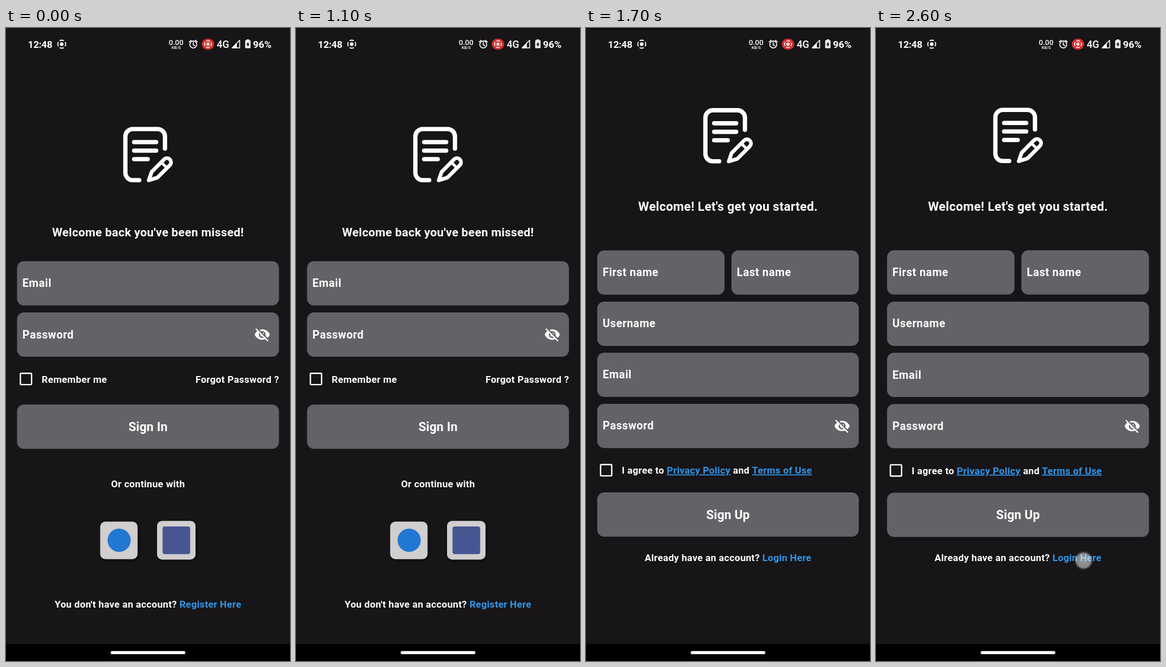
Animation, 502 px wide and 1115 px high, one loop 2.7 s. Source, as an HTML page:

```html
<!DOCTYPE html>
<html lang="en">
<head>
<meta charset="utf-8">
<title>Sign in and sign up</title>
<style>
  html, body { margin: 0; width: 100%; height: 100%; overflow: hidden; background: #000; }
  svg { display: block; width: 100vw; height: 100vh; }
  text { font-family: Roboto, sans-serif; font-weight: 700; fill: #fff; white-space: pre; }
  .label { font-size: 19.53px; letter-spacing: .55px; }
  .body { font-size: 17.08px; letter-spacing: .305px; }
  .h1 { font-size: 20.75px; letter-spacing: .305px; }
  .h2 { font-size: 21.96px; letter-spacing: .305px; }
  .btn { font-size: 21.96px; letter-spacing: .12px; }
  .link { fill: #2f97ea; }
  .under { text-decoration: underline; }
  .mid { text-anchor: middle; }
  .end { text-anchor: end; }
  .line { fill: none; stroke: #fff; stroke-linecap: round; stroke-linejoin: round; }
</style>
</head>
<body>
<svg viewBox="0 0 502 1115" preserveAspectRatio="none">
  <defs>
    <g id="note" class="line" stroke-width="7.6">
      <path d="M281 212.5V191a13 13 0 0 0-13-13H224a13 13 0 0 0-13 13V255a13 13 0 0 0 13 13H235.5"/>
      <path d="M226.5 201H265.5M226.5 216H265.5M226.5 231H250.5"/>
      <path stroke-width="6.6" d="M279.4 231.4L257.5 253.3L252.3 268.3L267.7 263.5L289.6 241.6A7.2 7.2 0 0 0 279.4 231.4Z"/>
      <path stroke-width="5" d="M274.5 236.5L284.5 246.5"/>
    </g>
    <path id="eye" fill="#fff" transform="translate(-14.65 -14.65) scale(1.22)" d="M12 7c2.76 0 5 2.24 5 5 0 .65-.13 1.26-.36 1.83l2.92 2.92c1.51-1.26 2.7-2.89 3.43-4.75-1.73-4.39-6-7.5-11-7.5-1.4 0-2.74.25-3.98.7l2.16 2.16C10.74 7.13 11.35 7 12 7zM2 4.27l2.28 2.28.46.46C3.08 8.3 1.78 10.02 1 12c1.73 4.39 6 7.5 11 7.5 1.55 0 3.03-.3 4.38-.84l.42.42L19.73 22 21 20.73 3.27 3 2 4.27zM7.53 9.8l1.55 1.55c-.05.21-.08.43-.08.65 0 1.66 1.34 3 3 3 .22 0 .44-.03.65-.08l1.55 1.55c-.67.33-1.41.53-2.2.53-2.76 0-5-2.24-5-5 0-.79.2-1.53.53-2.2zm4.31-.78l3.15 3.15.02-.16c0-1.66-1.34-3-3-3l-.17.01z"/>
    <g id="cast">
      <circle r="3.2" fill="#fff"/>
      <circle r="7" fill="none" stroke="#fff" stroke-width="1.8" pathLength="8" stroke-dasharray="1.45 .55" stroke-dashoffset=".725"/>
    </g>
    <radialGradient id="glow">
      <stop offset="0" stop-color="#fff" stop-opacity=".56"/>
      <stop offset=".62" stop-color="#fff" stop-opacity=".5"/>
      <stop offset=".76" stop-color="#fff" stop-opacity=".42"/>
      <stop offset=".84" stop-color="#fff" stop-opacity=".14"/>
      <stop offset="1" stop-color="#fff" stop-opacity="0"/>
    </radialGradient>
    <filter id="shade" x="-30%" y="-30%" width="160%" height="160%">
      <feDropShadow dx="2" dy="3" stdDeviation="3" flood-color="#000" flood-opacity=".5"/>
    </filter>
  </defs>

  <rect width="502" height="1115"/>
  <g id="login"></g>
  <g id="signup"></g>

  <g id="status">
    <text x="38.8" y="34.6" font-size="17.2" letter-spacing="-.25">12:48</text>
    <use href="#cast" x="98.5" y="28.5"/>
    <text x="300.7" y="30" class="mid" font-size="13" style="font-weight:500">0.00</text>
    <text x="300.8" y="37.3" class="mid" font-size="7.2" style="font-weight:500">KB/S</text>
    <g class="line" stroke-width="1.6">
      <circle cx="331" cy="29" r="6.1"/>
      <path d="M331 25.3V29.5L333.8 31.2M323.8 24.6L327.2 21.7M338.2 24.6L334.8 21.7"/>
    </g>
    <rect x="346" y="18.8" width="22" height="19.4" rx="9.7" fill="#d3302f"/>
    <use href="#cast" transform="translate(357 28.5) scale(.86)"/>
    <text x="372.6" y="34.8" font-size="17.6" style="font-weight:500">4G</text>
    <path d="M399.8 35L413 35V21.5Z" class="line" stroke-width="1.5"/>
    <path d="M399 35.5H408V26.5Z" fill="#fff"/>
    <path d="M425.5 20H429.5V21.6H431A1.2 1.2 0 0 1 432.2 22.8V34.4A1.2 1.2 0 0 1 431 35.6H424A1.2 1.2 0 0 1 422.8 34.4V22.8A1.2 1.2 0 0 1 424 21.6H425.5Z" fill="#fff"/>
    <path d="M428.3 23.8L424.6 29.7H427V33.7L430.5 27.8H428.3Z" fill="#171518"/>
    <text x="436.6" y="34.6" font-size="17.4">96%</text>
  </g>
  <rect y="1085.5" width="502" height="29.5"/>
  <rect x="185" y="1097.6" width="132" height="5.4" rx="2.7" fill="#fff"/>
  <circle id="touch" r="17"/>
</svg>
<script>
const LOOP = 2700, STEP = 100;
const $ = id => document.getElementById(id);

const text = (x, y, cls, s) => `<text x="${x}" y="${y}" class="${cls}">${s}</text>`;
const link = (s, cls = '') => `<tspan class="link ${cls}">${s}</tspan>`;
const box = (x, y, w) =>
  `<rect x="${x}" y="${y}" width="${w}" height="78" rx="12.2" fill="#646266"/>`;
const field = (y, s, x = 19.5, w = 463) =>
  box(x, y, w) + text(x + 9.6, y + 45.5, 'label', s);
const button = (y, s) => box(19.5, y, 463) + text(251, y + 46.8, 'btn mid', s);
const check = y =>
  `<rect x="25.4" y="${y - 9.9}" width="19.8" height="19.8" rx="1.5" fill="none" stroke="#fff" stroke-width="2.4"/>`;
const tile = (x, y, size) =>
  `<rect x="${x}" y="${y}" width="${size}" height="${size}" rx="9" fill="#d1cecf" filter="url(#shade)"/>`;
const icon = (id, x, y) => `<use href="#${id}" x="${x}" y="${y}"/>`;
const page = '<rect width="502" height="1085.5" fill="#171518"/>';

$('login').innerHTML = page + icon('note', 0, 0)
  + text(251, 367, 'h1 mid', "Welcome back you've been missed!")
  + field(410.8, 'Email') + field(501, 'Password') + icon('eye', 453, 540)
  + check(618.2) + text(63, 624.6, 'body', 'Remember me')
  + text(482.8, 624.6, 'body end', 'Forgot Password ?')
  + button(663.3, 'Sign In')
  + text(251, 808.6, 'body mid', 'Or continue with')
  + tile(166.5, 869.5, 66) + '<circle cx="200" cy="902.3" r="20.5" fill="#2277d2"/>'
  + tile(267, 868.2, 68) + '<rect x="276.7" y="878" width="48.8" height="48.8" rx="4" fill="#475692"/>'
  + text(251, 1021, 'body mid', "You don't have an account? " + link('Register Here'));

$('signup').innerHTML = page + icon('note', 0, -33.7)
  + text(251, 322, 'h2 mid', "Welcome! Let's get you started.")
  + field(391.6, 'First name', 19.5, 225.4) + field(391.6, 'Last name', 257, 225.5)
  + field(481.9, 'Username') + field(572, 'Email') + field(662.2, 'Password')
  + icon('eye', 453, 701.2)
  + check(779.3)
  + text(63, 785.7, 'body', 'I agree to ' + link('Privacy Policy', 'under') + ' and ' + link('Terms of Use', 'under'))
  + button(818.5, 'Sign Up')
  + text(251, 939.2, 'body mid', 'Already have an account? ' + link('Login Here'));

function touch(x, y, fill, opacity, r) {
  const set = { cx: x, cy: y, fill, opacity, r };
  for (const k in set) $('touch').setAttribute(k, set[k]);
}

function draw(ms) {
  const t = Math.floor(ms % LOOP / STEP) * STEP;
  const signup = t >= 1600;
  const scale = t === 1600 ? .9892 : t === 1700 ? .9985 : 1;
  $('login').style.display = signup ? 'none' : '';
  $('signup').style.display = signup ? '' : 'none';
  $('signup').setAttribute('transform',
    `translate(251 545) scale(${scale}) translate(-251 -545)`);
  if (t === 1500) touch(366.5, 1016.5, 'url(#glow)', .82, 17.5);
  else if (t === 1600) touch(366, 1016.5, '#fff', .14, 13);
  else if (t === 2600) touch(367, 938, 'url(#glow)', 1, 17.5);
  else touch(0, 0, 'none', 0, 0);
}

const start = performance.now();
function tick() {
  draw(performance.now() - start);
  requestAnimationFrame(tick);
}
tick();
</script>
</body>
</html>
```
